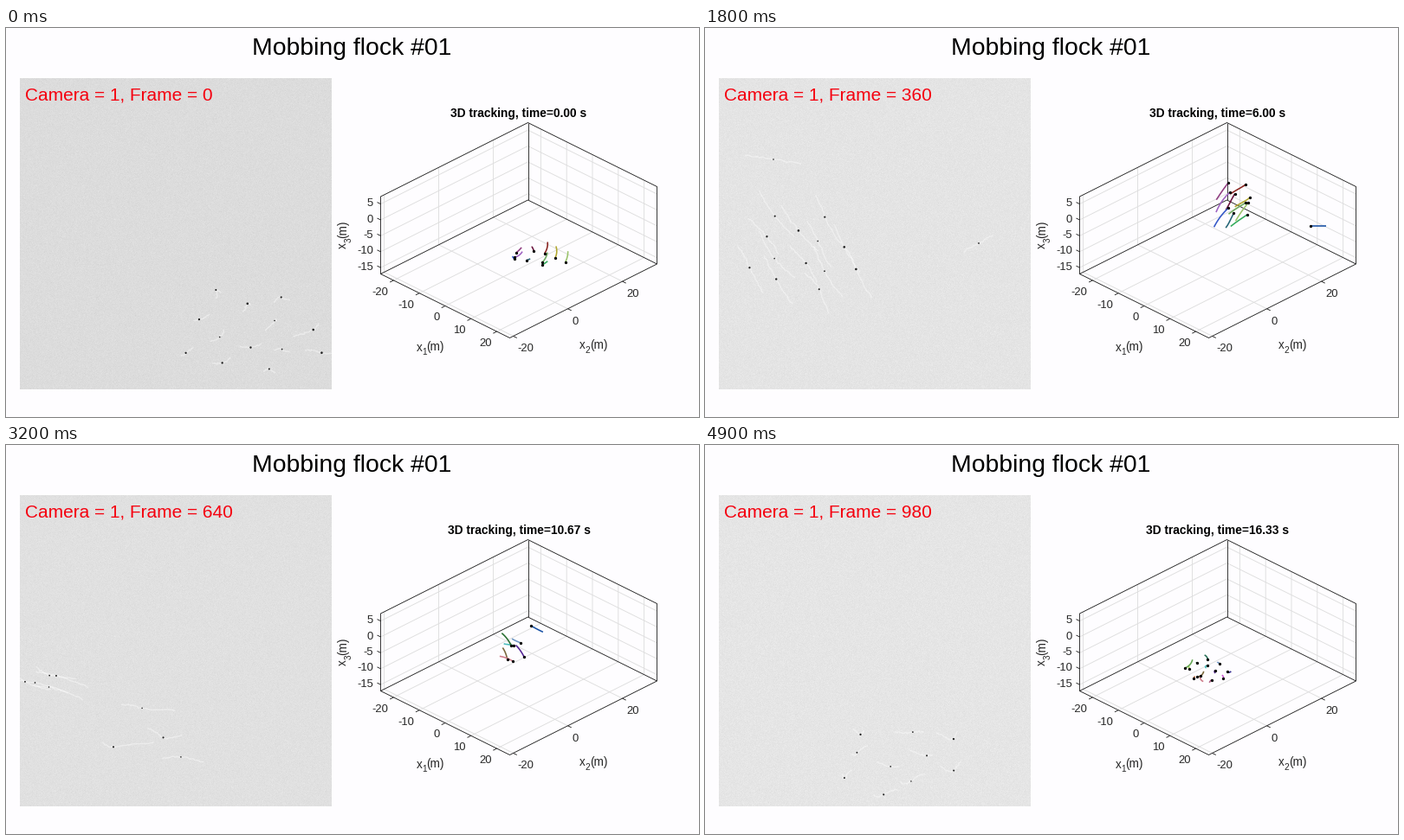
Recreate the animation shown at these times as a matplotlib script. Size 800 px wide and 450 px high, loop 5000 ms.

```python
import colorsys

import matplotlib.pyplot as plt
import numpy as np
from matplotlib.animation import FuncAnimation
from matplotlib.collections import LineCollection
from matplotlib.patches import Rectangle

W, H, DPI = 800, 450, 100
FRAMES, INTERVAL = 50, 100
TRAIL = 2.5      # trail length, in animation steps
PX = 72 / DPI
INK = "#262626"
GOLDEN = 0.618034

plt.rcParams["font.family"] = "Liberation Sans"
fig = plt.figure(figsize=(W / DPI, H / DPI), dpi=DPI, facecolor="#fefdff")
ax = fig.add_axes([0, 0, 1, 1])
ax.axis("off")


class Flock:
    """Birds spread over an ellipse whose centre glides through a few poses.

    A pose is (step, x, y, x speed, y speed, x radius, y radius).
    Birds join one by one during the first `joining` steps.
    """

    def __init__(self, count, start, end, *poses, joining=0, wander=4.0, seed=1):
        rng = np.random.default_rng(seed)
        poses = np.array(poses, float)
        self.t, self.p, self.v, self.r = np.split(poses, [1, 3, 5], axis=1)
        self.t = self.t[:, 0]
        n = np.arange(count)
        angle = 2 * np.pi * (n * GOLDEN + rng.random())
        radius = np.sqrt((n + 0.5) / count) if count > 1 else np.zeros(1)
        self.place = radius[:, None] * np.column_stack([np.cos(angle), np.sin(angle)])
        self.phase = rng.uniform(0, 2 * np.pi, count)
        self.pace = rng.uniform(0.4, 0.8, count)
        self.size = rng.uniform(1.5, 2.8, count)
        self.color = [colorsys.hsv_to_rgb((i * GOLDEN + 0.1 * seed) % 1,
                                          rng.uniform(0.4, 0.85), rng.uniform(0.3, 0.85))
                      for i in n]
        self.wander = wander
        self.start, self.end = start + joining * n / count, end

    def present(self, step):
        return np.flatnonzero((self.start <= step) & (step <= self.end))

    def centre(self, t):
        inside = np.clip(t, self.t[0], self.t[-1])
        i = np.clip(np.searchsorted(self.t, inside) - 1, 0, len(self.t) - 2)
        h = (self.t[i + 1] - self.t[i])[:, None]
        u = (inside - self.t[i])[:, None] / h
        pos = ((1 + 2 * u) * (1 - u) ** 2 * self.p[i] + u * (1 - u) ** 2 * h * self.v[i]
               + u * u * (3 - 2 * u) * self.p[i + 1] + u * u * (u - 1) * h * self.v[i + 1])
        edge = np.where((t < self.t[0])[:, None], self.v[0], self.v[-1])
        return pos + (t - inside)[:, None] * edge

    def path(self, bird, t):
        radii = np.column_stack([np.interp(t, self.t, r) for r in self.r.T])
        swing = self.pace[bird] * t + self.phase[bird]
        loop = np.column_stack([np.cos(swing), np.sin(swing)]) * self.wander
        return self.centre(t) + radii * self.place[bird] + loop


tracked = [
    Flock(10, -9, 19, (0, 612, 266, -1, 3, 34, 11), (7, 584, 265, -4, -3.5, 26, 11),
          (14, 593, 226, 6, -6.5, 15, 26), seed=3),
    Flock(1, 18, 35, (22, 671, 229, -7, 0, 0, 0), (32, 606, 209, -5, -3, 0, 0),
          wander=0, seed=6),
    Flock(13, 28, 60, (32, 586, 240, 4, 3.5, 22, 24), (38, 580, 232, 1.5, 5, 18, 34),
          (49, 578, 262, -1, 0.5, 32, 14), joining=9, seed=5),
]

filmed = [
    Flock(13, -9, 19, (0, 285, 355, -3, 1, 95, 55), (7, 245, 360, -8, -3, 62, 42),
          (14, 142, 303, -7, -10, 72, 55), seed=2),
    Flock(1, 18, 24, (19, 66, 150, -13, -2, 0, 0), (22, 27, 144, -13, -2, 0, 0),
          wander=0, seed=4),
    Flock(1, 18, 26, (19, 323, 245, 7, -4, 0, 0), (22, 343, 234, 7, -4, 0, 0),
          wander=0, seed=7),
    Flock(10, 28, 60, (32, 42, 273, 8, 3, 45, 16), (38, 130, 306, 10, 4, 42, 32),
          (49, 220, 365, 4, -2, 88, 46), joining=9, seed=8),
    Flock(4, 29, 42, (32, 165, 345, 8, 2, 62, 40), (38, 243, 350, 6, 4, 14, 45), seed=9),
]


def label(x, y, s, size, **kw):
    kw = {"color": INK, "va": "baseline", **kw}
    return ax.text(x, y, s, fontsize=size * PX, **kw)


def line(*points, width=0.9, color=INK, z=1):
    ax.plot(*zip(*points), color=color, lw=width * PX, zorder=z, solid_capstyle="butt")


def axis_name(x, y, index, vertical=False):
    parts = (("x", 0, 0, 13.5), (index, 6.6, 4.5, 10), ("(m)", 12, 0, 13.5))
    for s, along, drop, size in parts:
        if vertical:
            label(x + drop, y - along, s, size, rotation=90, ha="right", va="bottom")
        else:
            label(x + along, y + drop, s, size)


def draw_box():
    left, front = np.array([432.5, 284.5]), np.array([581.5, 358.5])
    x1, x2, up = np.array([149, 74]), np.array([170, -85.5]), np.array([0, -89.5])
    right, back = front + x2, left + x2
    grid = dict(width=0.9, color="#dedede", z=0.5)

    for v in range(-20, 21, 10):
        p = left + x1 * (v + 25) / 50
        line(p, p + x2, p + x2 + up, **grid)
        line(p, p - x2 * 0.025)
        label(p[0] - 6, p[1] + 17, str(v), 13, ha="right")
    for v in range(-20, 21, 20):
        p = front + x2 * (v + 21.3) / 54
        line(p, p - x1, p - x1 + up, **grid)
        line(p, p + x1 * 0.028)
        label(p[0] + 5, p[1] + 18, str(v), 13)
    for v in range(-15, 6, 5):
        p = left - [0, 62.5 + 3.68 * v]
        line(p, p + x2, p + x2 + x1, **grid)
        line(p, p - [4, 2])
        label(424, p[1] + 2.6, str(v), 13, ha="right")

    line(left, front, right, back, left)
    line(left, left + up, back + up, right + up, right)
    line(back, back + up)
    axis_name(473.5, 373.5, "1")
    axis_name(662, 371, "2")
    axis_name(396, 255, "3", vertical=True)


draw_box()
label(399.5, 31, "Mobbing flock #01", 28.4, ha="center", color="black")
camera_text = label(22.5, 84, "", 20.9, color="#f5000f", zorder=6)
time_text = label(592, 102.5, "", 13.8, ha="center", color="black", weight="bold")

noise = np.random.default_rng(4).normal(0, 0.009, (360, 360))
photo = ax.imshow(noise, cmap="gray", vmin=0, vmax=1, extent=(16, 376, 418, 58),
                  interpolation="nearest", aspect="auto", zorder=1)
ax.set(xlim=(0, W), ylim=(H, 0))
panel = Rectangle((16, 58), 360, 360, transform=ax.transData)

streaks = LineCollection([], colors="white", linewidths=1.4 * PX, alpha=0.42, zorder=2)
birds = ax.scatter([], [], color="#202020", linewidths=0, zorder=3)
trails = LineCollection([], linewidths=1.6 * PX, zorder=3)
heads = ax.scatter([], [], s=(3.3 * PX) ** 2, color="black", linewidths=0, zorder=4)
for lines in (streaks, trails):
    ax.add_collection(lines, autolim=False)
for artist in (streaks, birds):
    artist.set_clip_path(panel)


def collect(flocks, times, step):
    """Paths of all visible birds with their flock and number."""
    seen = [(flock, i) for flock in flocks for i in flock.present(step)]
    return seen, [flock.path(i, times) for flock, i in seen]


def place_dots(dots, seen, step):
    now = np.array([float(step)])
    dots.set_offsets(np.array([f.path(i, now)[0] for f, i in seen]).reshape(-1, 2))


def draw(step):
    camera_text.set_text(f"Camera = 1, Frame = {step * 20}")
    time_text.set_text(f"3D tracking, time={step / 3:.2f} s")
    photo.set_data(np.interp(step, (0, 2, 14, 32, 49), (0.86, 0.893, 0.897, 0.877, 0.897)) + noise)

    rng = np.random.default_rng(step)
    around = step + np.linspace(-TRAIL, TRAIL, 20)
    seen, paths = collect(filmed, around, step)
    streaks.set_segments([p + rng.normal(0, 0.5, p.shape) for p in paths])
    place_dots(birds, seen, step)
    birds.set_sizes([(f.size[i] * PX) ** 2 for f, i in seen])

    past = step + np.linspace(-TRAIL, 0, 12)
    seen, paths = collect(tracked, past, step)
    trails.set_segments(paths)
    trails.set_color([f.color[i] for f, i in seen])
    place_dots(heads, seen, step)
    return camera_text, time_text, photo, streaks, birds, trails, heads


anim = FuncAnimation(fig, draw, frames=FRAMES, interval=INTERVAL, repeat=True,
                     repeat_delay=0, blit=False)
plt.show()
```
